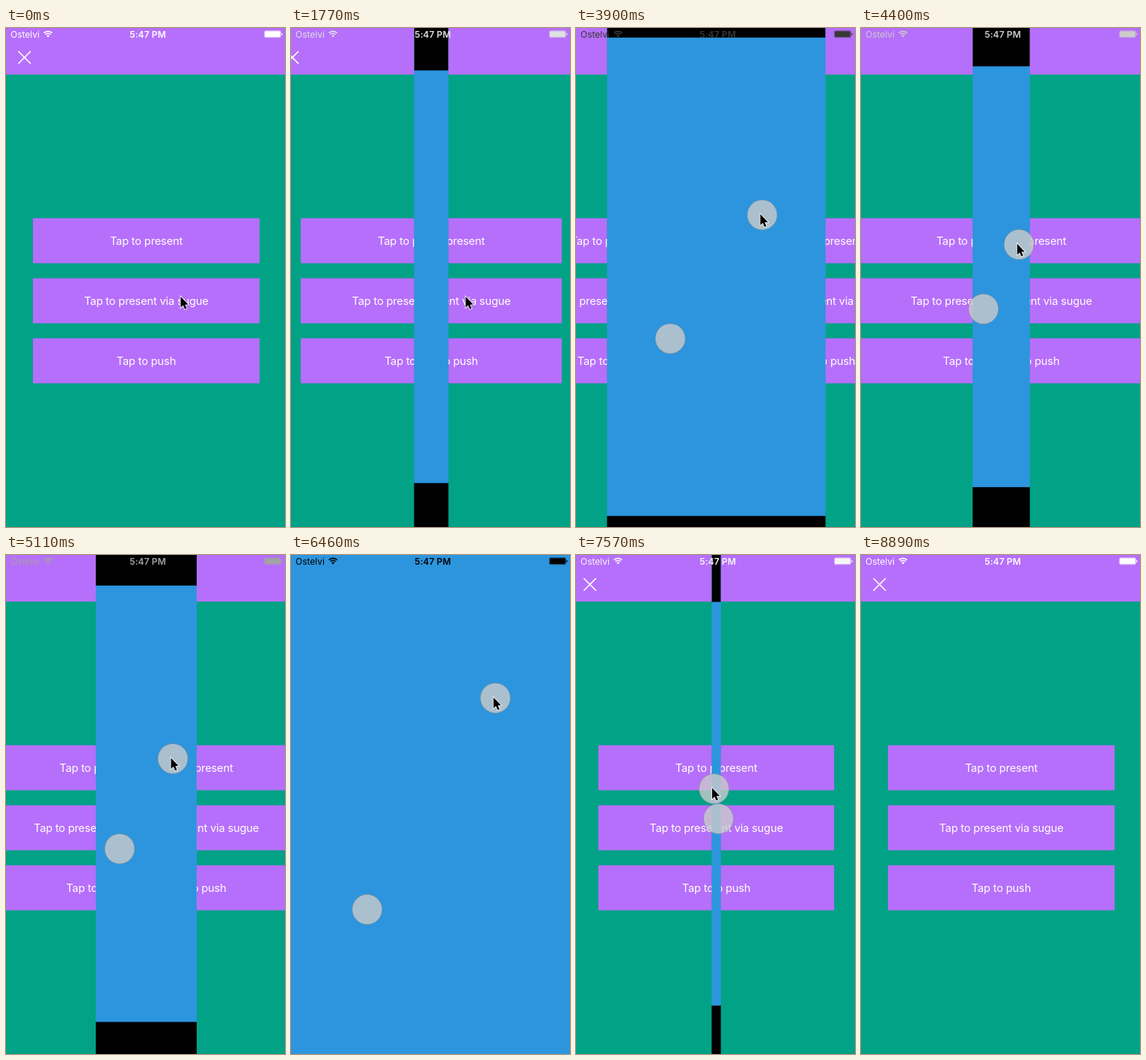
These frames come from a looping animation (373x665 px, 9.19 s). An HTML page with a canvas:

```html
<!DOCTYPE html>
<html lang="en">
<head>
<meta charset="utf-8">
<title>Door transition</title>
<style>
  html, body { margin: 0; width: 100%; height: 100%; overflow: hidden; background: #000; }
  canvas { display: block; width: 373px; height: 665px; }
</style>
</head>
<body>
<canvas id="stage"></canvas>
<script>
const W = 373, H = 665, LOOP = 9190;
const CX = 187.5, CY = 331.5, SCREEN_W = 375, SCREEN_H = 667;
const PURPLE = '#b66ffa', GREEN = '#02a287', BLUE = '#2d95dd';
const SANS = 'Inter, Roboto, sans-serif';

const canvas = document.getElementById('stage');
const ctx = canvas.getContext('2d');
const dpr = window.devicePixelRatio || 1;
canvas.width = W * dpr;
canvas.height = H * dpr;

// Pointer tip: time, x, y
const PATH = [
  [0, 233.5, 358], [2390, 233.5, 358], [2760, 268, 212], [2850, 269.5, 210],
  [3410, 269.5, 210], [3900, 246.5, 248], [4340, 210, 286], [4460, 209.5, 287],
  [4570, 209.5, 287], [5110, 220.5, 270.5], [5520, 270, 191], [5630, 270.8, 189.5],
  [6440, 270.8, 189.5], [7350, 184, 303], [7570, 182, 310.5], [7970, 182, 310.5],
  [8360, 238.5, 575.5], [8560, 238.5, 575.5], [8890, 326, 668], [LOOP, 326, 668]
];
const PRESENT = { start: 1660, end: 2610 };
const PINCH = { show: 2640, press: 3210, start: 3430, release: 7610, end: 7740, span: 158, lag: 35 };

const clamp = v => Math.max(0, Math.min(1, v));

function bezier(x1, y1, x2, y2) {
  const at = (a, b, s) => 3 * a * s * (1 - s) ** 2 + 3 * b * s * s * (1 - s) + s ** 3;
  return x => {
    if (x <= 0 || x >= 1) return clamp(x);
    let lo = 0, hi = 1;
    for (let i = 0; i < 24; i++) {
      const mid = (lo + hi) / 2;
      if (at(x1, x2, mid) < x) lo = mid; else hi = mid;
    }
    return at(y1, y2, lo);
  };
}
const ease = bezier(0.25, 0.1, 0.25, 1);
const easeInOut = bezier(0.42, 0, 0.58, 1);

// Tangent is zero next to a hold or a turning point
function tangent(i, axis) {
  const a = PATH[i - 1], b = PATH[i], c = PATH[i + 1];
  if (!a || !c || (b[axis] - a[axis]) * (c[axis] - b[axis]) <= 0) return 0;
  return (c[axis] - a[axis]) / (c[0] - a[0]);
}

function pointer(t) {
  let i = 0;
  while (i < PATH.length - 2 && PATH[i + 1][0] <= t) i++;
  const a = PATH[i], b = PATH[i + 1], dt = b[0] - a[0], u = clamp((t - a[0]) / dt);
  const h = u * u * (3 - 2 * u);
  const [x, y] = [1, 2].map(k =>
    a[k] + (b[k] - a[k]) * h
    + dt * u * (1 - u) * ((1 - u) * tangent(i, k) - u * tangent(i + 1, k)));
  return { x, y };
}

function touch(t) {
  const p = pointer(t);
  return { x: p.x + 2.5, y: p.y + 1 };
}

// 0 = doors closed, 1 = doors fully open
function openness(t) {
  if (t < PINCH.start) return ease((t - PRESENT.start) / (PRESENT.end - PRESENT.start));
  if (t >= PINCH.end) return 0;
  const p = touch(Math.min(t, PINCH.release) - PINCH.lag);
  const open = easeInOut(Math.hypot(p.x - CX, p.y - CY) / PINCH.span);
  return open * (1 - clamp((t - PINCH.release) / (PINCH.end - PINCH.release)));
}

function rect(color, x, y, w, h) {
  ctx.fillStyle = color;
  ctx.fillRect(x, y, w, h);
}

function text(str, x, y, font, color, align = 'center', spacing = 0) {
  ctx.font = font + ' ' + SANS;
  ctx.letterSpacing = spacing + 'px';
  ctx.textAlign = align;
  ctx.fillStyle = color;
  ctx.fillText(str, x, y);
}

function button(label, y, alpha = 1) {
  rect(PURPLE, 36, y, 303, 60);
  text(label, CX, y + 35.8, '14.7px', `rgba(255,255,255,${alpha})`, 'center', -0.2);
}

function drawMenu(t) {
  rect(GREEN, 0, 0, SCREEN_W, H);
  rect(PURPLE, 0, 0, SCREEN_W, 62);
  ctx.strokeStyle = '#fff';
  ctx.lineWidth = 1.7;
  ctx.beginPath();
  ctx.moveTo(16.5, 31); ctx.lineTo(33, 47.5);
  ctx.moveTo(33, 31); ctx.lineTo(16.5, 47.5);
  ctx.stroke();
  const held = t >= 1560 && t < 1700;
  button('Tap to present', 253.5);
  button('Tap to present via sugue', 333.5, held ? 0.3 : 1);
  button('Tap to push', 413.5);
}

function drawDoor(t, side, shift) {
  ctx.save();
  ctx.translate(side * shift, 0);
  ctx.beginPath();
  ctx.rect(side < 0 ? 0 : CX, 0, CX, H);
  ctx.clip();
  drawMenu(t);
  ctx.restore();
}

function drawScene(t, open) {
  if (open <= 0) return drawMenu(t);
  rect('#000', 0, 0, W, H);
  const scale = 0.8 + 0.2 * open, w = SCREEN_W * scale, h = SCREEN_H * scale;
  rect(BLUE, CX - w / 2, CY - h / 2, w, h);
  if (open < 1) {
    drawDoor(t, -1, CX * open);
    drawDoor(t, 1, CX * open);
  }
}

function drawStatus(open) {
  const g = Math.round(255 * (1 - open)), color = `rgb(${g},${g},${g})`;
  text('Ostelvi', 6, 12.6, '12px', color, 'left');
  text('5:47 PM', 189.5, 12.6, '600 12px', color, 'center', 0.1);

  ctx.strokeStyle = ctx.fillStyle = color;
  ctx.lineWidth = 1.6;
  const from = -Math.PI * 0.75, to = -Math.PI * 0.25;
  for (const r of [7.8, 5]) {
    ctx.beginPath();
    ctx.arc(56.2, 12.2, r, from, to);
    ctx.stroke();
  }
  ctx.beginPath();
  ctx.moveTo(56.2, 12.4);
  ctx.arc(56.2, 12.2, 2.8, from, to);
  ctx.fill();

  ctx.lineWidth = 0.8;
  ctx.globalAlpha = 0.6;
  ctx.beginPath();
  ctx.roundRect(345.4, 3.7, 22, 9, 1.8);
  ctx.stroke();
  ctx.globalAlpha = 1;
  ctx.beginPath();
  ctx.roundRect(346, 4.3, 20.8, 7.8, 1);
  ctx.roundRect(368.2, 6.7, 1.3, 3, 0.6);
  ctx.fill();
}

function drawTouches(t) {
  if (t < PINCH.show || t >= PINCH.release + 20) return;
  const p = touch(t);
  ctx.globalAlpha = t < PINCH.press ? 0.7 : 1;
  ctx.lineWidth = 1;
  for (const [x, y] of [[p.x, p.y], [2 * CX - p.x, 2 * CY - p.y]]) {
    ctx.beginPath();
    ctx.arc(x, y, 20, 0, Math.PI * 2);
    ctx.fillStyle = 'rgba(203,203,203,0.8)';
    ctx.fill();
    ctx.strokeStyle = 'rgba(125,135,145,0.55)';
    ctx.stroke();
  }
  ctx.globalAlpha = 1;
}

function drawPointer(t) {
  if (t >= 8890) return;
  const { x, y } = pointer(t);
  const shape = [[0, 0], [0, 14.6], [3.3, 11.6], [5.6, 16.8], [8, 15.8], [5.8, 10.8], [10.2, 10.6]];
  ctx.beginPath();
  shape.forEach(([dx, dy]) => ctx.lineTo(x + dx, y + dy));
  ctx.closePath();
  ctx.lineJoin = 'miter';
  ctx.lineWidth = 1.6;
  ctx.strokeStyle = '#fff';
  ctx.stroke();
  ctx.fillStyle = '#000';
  ctx.fill();
}

const begin = performance.now();
function frame() {
  const t = (performance.now() - begin) % LOOP;
  const open = openness(t);
  ctx.setTransform(dpr, 0, 0, dpr, 0, 0);
  drawScene(t, open);
  drawStatus(open);
  drawTouches(t);
  drawPointer(t);
  requestAnimationFrame(frame);
}
frame();
</script>
</body>
</html>
```
